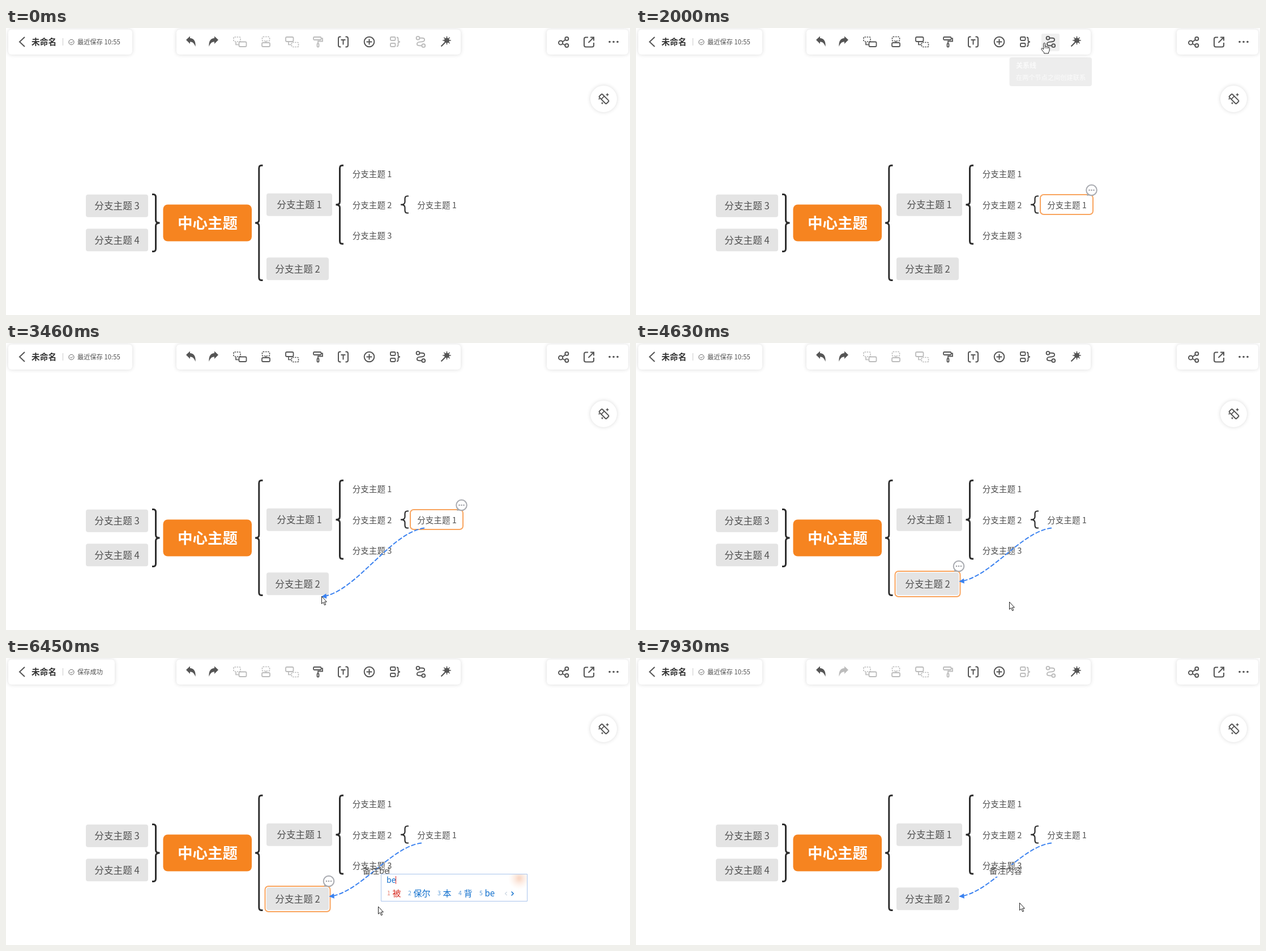
Recreate the animation shown at these times as an HTML page with a canvas. Size 1102x508 px, loop 8 s.

```html
<!DOCTYPE html>
<html lang="zh-CN">
<head>
<meta charset="utf-8">
<title>思维导图</title>
<style>
html, body { margin: 0; width: 100%; height: 100%; overflow: hidden; background: #fff; }
canvas { display: block; width: 1102px; height: 508px; }
</style>
</head>
<body>
<canvas id="stage" width="1102" height="508"></canvas>
<script>
const c = document.getElementById('stage').getContext('2d');
const LOOP = 8000;
const FAMILY = '"Noto Sans CJK SC", "Noto Sans CJK", sans-serif';
const DARK = '#555', FADED = '#bcbcbc', INK = '#333', SOFT = '#505050';
const BLUE = '#3b82f0', ORANGE = '#f68420';

// ---------- helpers ----------
function font(size, weight = 350) { c.font = `${weight} ${size}px ${FAMILY}`; }

function text(str, x, cy, size, color = INK, weight = 350, align = 'left') {
  font(size, weight);
  c.fillStyle = color;
  c.textAlign = align;
  c.fillText(str, x, cy + size * 0.38);
}

function measure(str, size, weight = 350) {
  font(size, weight);
  return c.measureText(str).width;
}

function stroke(path, color = DARK, width = 2, dash = []) {
  c.strokeStyle = color;
  c.lineWidth = width;
  c.setLineDash(dash);
  c.stroke(new Path2D(path));
  c.setLineDash([]);
}

function fill(path, color = DARK) {
  c.fillStyle = color;
  c.fill(new Path2D(path));
}

function box(x, y, w, h, r, color) {
  c.beginPath();
  c.roundRect(x, y, w, h, r);
  c.fillStyle = color;
  c.fill();
}

function frame(x, y, w, h, r, color, width = 2, dash = []) {
  c.beginPath();
  c.roundRect(x, y, w, h, r);
  c.strokeStyle = color;
  c.lineWidth = width;
  c.setLineDash(dash);
  c.stroke();
  c.setLineDash([]);
}

function dot(x, y, r, color) {
  c.beginPath();
  c.arc(x, y, r, 0, 7);
  c.fillStyle = color;
  c.fill();
}

function ring(x, y, r, color = DARK, width = 2) {
  c.beginPath();
  c.arc(x, y, r, 0, 7);
  c.strokeStyle = color;
  c.lineWidth = width;
  c.stroke();
}

function panel(x, y, w, h, r) {
  c.save();
  c.shadowColor = 'rgba(0,0,0,.15)';
  c.shadowBlur = 7;
  box(x, y, w, h, r, '#fff');
  c.restore();
}

function lastKey(keys, t) {
  let found = null;
  for (const k of keys) if (t >= k[0]) found = k;
  return found;
}

// ---------- timing ----------
const PATH = [
  [130, 1084, 494], [300, 990, 468], [480, 840, 430], [620, 740, 395], [760, 757, 357],
  [900, 748, 311], [1440, 748, 311], [1580, 738, 220], [1720, 725, 110], [1860, 720, 42],
  [2000, 721, 26], [2210, 724, 25], [2280, 726, 24], [2750, 726, 24], [2890, 722, 70],
  [3030, 706, 210], [3180, 682, 360], [3250, 664, 410], [3320, 632, 450], [3390, 592, 472],
  [3460, 557, 448], [3530, 556, 444], [4220, 556, 444], [4360, 600, 464], [4500, 650, 472],
  [4630, 659, 458], [4770, 657, 439.5], [7120, 657, 439.5], [7320, 657, 438], [7790, 657, 438],
  [7860, 667, 436], [7930, 677, 433], [8000, 677, 433]
];

function cursorAt(t) {
  if (t < PATH[0][0]) return null;
  const i = PATH.findIndex(k => k[0] > t);
  const [t0, x0, y0] = PATH[i - 1], [t1, x1, y1] = PATH[i];
  const p = (t - t0) / (t1 - t0);
  return { x: x0 + (x1 - x0) * p, y: y0 + (y1 - y0) * p };
}

const CLICKS = [[900, 1040], [2750, 2890], [3530, 3670], [7520, 7590]];

// time, committed text, pending letters, candidates
const FIRST = '不 吧 把 被 版本', SECOND = '被 保尔 本 背 be', LONG = '内人 内容物 内热 内容简介 内绕';
const TYPING = [
  [5970, '', 'b', FIRST], [6110, '', 'bz', '备注 不在 本 把 吧'], [6310, '备注', ''],
  [6380, '备注', 'b', FIRST], [6450, '备注', 'be', SECOND], [6540, '备注', 'b', FIRST],
  [6620, '备注', ''], [6690, '备注', 'n', '你 那 呢 年 能'], [6760, '备注', 'ne', '呢 哪 讷 那 ne'],
  [6830, '备注', 'nei', '内 那 内部 馁 哪'], [6900, '备注', 'neir', LONG], [6980, '备注', 'neiro', LONG],
  [7050, '备注', 'neirong', '内容 内 哪 呢 那'], [7190, '备注内容', '']
];

// ---------- toolbar ----------
const UNDO = 'M318 21L325 14.5V18C331 18 335.5 23 334.5 33C332.5 27 329.5 24.5 325 24.5V28Z';

function toolbar(state, hover) {
  panel(301, 2.5, 502, 44.5, 6);
  if (hover) box(716, 10, 32, 31, 3, '#f0f0f0');
  const node = state.node ? DARK : FADED;
  const insert = state.insert ? DARK : FADED;
  const dash = [2.5, 1.6];

  fill(UNDO);
  c.save();
  c.translate(693, 0);
  c.scale(-1, 1);
  fill(UNDO, state.redo ? DARK : FADED);
  c.restore();

  frame(402, 16, 12, 8, 1.5, insert, 1.7, dash);
  stroke('M406 25V29.5H411', insert, 1.7);
  frame(411.5, 24.5, 13, 8.5, 2, insert, 1.8);

  frame(452.5, 15.5, 13, 7.5, 1.5, insert, 1.7, dash);
  stroke('M459 23V26', insert, 1.7);
  frame(452, 26, 14, 7, 2, insert, 1.8);

  frame(494, 16, 13.5, 8, 2, insert, 1.8);
  stroke('M499 24V29.5H504', insert, 1.7);
  frame(504.5, 25.5, 12, 8, 1.5, insert, 1.7, dash);

  frame(543, 16, 13.5, 5, 1.5, node, 1.8);
  stroke('M557 18.5H559V23.5H551V27', node, 1.8);
  frame(549.5, 27.5, 3, 6, 1, node, 1.8);

  stroke('M591.5 15.5H590Q587 15.5 587 18.5V30.5Q587 33.5 590 33.5H591.5M599.5 15.5H601Q604 15.5 604 18.5V30.5Q604 33.5 601 33.5H599.5');
  stroke('M591.5 21H599.5M595.5 21V29.5');

  ring(641.5, 24.5, 8.8);
  stroke('M636.5 24.5H646.5M641.5 19.5V29.5');

  frame(679, 16, 8.5, 6, 1.5, node, 1.9);
  frame(679, 27, 8.5, 6, 1.5, node, 1.9);
  stroke('M690 16.5Q692.5 16.5 692.5 19V22Q692.5 24.5 696 24.5Q692.5 24.5 692.5 27V30Q692.5 32.5 690 32.5', node, 1.9);

  ring(727.5, 17.8, 2.9, node, 1.9);
  ring(737.3, 31.2, 2.9, node, 1.9);
  stroke('M731 17.8H735C740.5 17.8 740.5 23.5 735 24.2L730 24.9C724.5 25.6 724.5 31.2 730 31.2H734', node, 1.9);

  stroke('M775 26L768.5 32.5', DARK, 2.2);
  dot(778.5, 22, 4.6, DARK);
  for (let i = 0; i < 8; i++) {
    const a = i * Math.PI / 4;
    const x = Math.cos(a), y = Math.sin(a);
    stroke(`M${778.5 + 4 * x} ${22 + 4 * y}L${778.5 + 7.3 * x} ${22 + 7.3 * y}`, DARK, 1.5);
  }
}

function header(saved) {
  panel(4, 2.5, saved ? 188 : 219, 44.5, 6);
  stroke('M33 16L24 24.5L33 33');
  text('未命名', 45, 24.5, 14.8, INK, 700);
  stroke('M100.5 18V31', '#ccc', 1);
  ring(115.5, 25, 4.6, '#666', 1);
  stroke('M113.3 25L115.1 26.8L118 23.6', '#666', 1);
  text(saved ? '保存成功' : '最近保存 10:55', 126, 24.8, 11.25, SOFT, 400);
}

function sideTools() {
  panel(955, 2.5, 144, 44.5, 6);
  stroke('M983 24.5L987.5 21M983 28L987.5 30.5');
  ring(979.6, 26, 3.6);
  ring(990.3, 19, 3);
  ring(990.3, 31, 3);
  stroke('M1028 16.5H1024Q1021 16.5 1021 19.5V30.5Q1021 33.5 1024 33.5H1035Q1038 33.5 1038 30.5V26M1028.5 26L1037.5 17M1032 16.5H1038V22.5');
  for (const x of [1066, 1073, 1080]) dot(x, 24.5, 1.8, DARK);

  panel(1032, 102, 47, 47, 23.5);
  c.save();
  c.translate(1056, 125.5);
  c.rotate(Math.PI / 4);
  frame(-9, -3.8, 18, 7.6, 1.5, DARK, 1.9);
  stroke('M-3 -3.8V3.8', DARK, 1.7);
  c.restore();
  for (const [x, y, r] of [[1062, 118, 3.2], [1053, 133, 2.4], [1047.5, 125.5, 1.8]]) {
    const q = r * 0.3;
    fill(`M${x} ${y - r}l${q} ${r - q}l${r - q} ${q}l${q - r} ${q}l${-q} ${r - q}l${-q} ${q - r}l${q - r} ${-q}l${r - q} ${-q}Z`);
  }
}

// ---------- mind map ----------
function brace(end, spine, tip, top, bottom, mid, width) {
  const d = Math.sign(end - spine), e = spine + d * 4;
  stroke(`M${end} ${top}H${e}Q${spine} ${top} ${spine} ${top + 5}V${mid - 5}Q${spine} ${mid} ${tip} ${mid}` +
    `Q${spine} ${mid} ${spine} ${mid + 5}V${bottom - 5}Q${spine} ${bottom} ${e} ${bottom}H${end}`, '#2e2e2e', width);
}

function node(label, x, y, w) {
  box(x, y, w, 40, 4, '#e4e4e4');
  text(label, x + w / 2, y + 20, 16.6, SOFT, 350, 'center');
}

function leaf(label, x, y) { text(label, x, y, 14.6, SOFT, 350, 'center'); }

function mindMap() {
  node('分支主题 3', 141, 294.7, 110);
  node('分支主题 4', 141, 355.3, 110);
  node('分支主题 1', 460, 292.7, 116);
  node('分支主题 2', 460, 406.3, 110);
  box(277.5, 312.5, 156.5, 65, 8, ORANGE);
  text('中心主题', 356, 345, 26.5, '#fff', 700, 'center');
  brace(258, 264.5, 271.5, 294.5, 395.5, 345, 3);
  brace(453.5, 446.8, 440, 243.2, 446.5, 345, 3);
  brace(596, 589.5, 582.5, 243.2, 382, 312.7, 3);
  brace(711, 704.5, 697, 297.5, 327.5, 312.7, 2.2);
  leaf('分支主题 1', 646.5, 258);
  leaf('分支主题 2', 646.5, 313);
  leaf('分支主题 3', 646.5, 367.5);
  leaf('分支主题 1', 761, 313);
}

function bubble(x, y) {
  fill(`M${x - 8} ${y + 4}L${x - 8} ${y + 10}L${x - 1} ${y + 9}Z`, '#aaa');
  dot(x, y, 9.3, '#fff');
  ring(x, y, 9.3, '#a8aab0', 2);
  for (const d of [-4, 0, 4]) dot(x + d, y, 1.3, '#a0a2a8');
}

function selection(x, y, w, h, bx, by, solid) {
  c.globalAlpha = solid ? 1 : 0.5;
  frame(x, y, w, h, 6, '#f9a45e', solid ? 2 : 1.5);
  c.globalAlpha = 1;
  bubble(bx, by);
}

// ---------- relation line ----------
function relation(x0, y0, x1, y1) {
  const dx = x1 - x0, dy = y1 - y0;
  const qx = x0 + dx * 0.67, qy = y0 + dy * 0.94;
  stroke(`M${x0} ${y0}C${x0 + dx * 0.33} ${y0 + dy * 0.06} ${qx} ${qy} ${x1} ${y1}`, BLUE, 2, [8, 3]);
  c.save();
  c.translate(x1, y1);
  c.rotate(Math.atan2(y1 - qy, x1 - qx));
  fill('M1 0L-8 -4.5V4.5Z', BLUE);
  c.restore();
}

function dragLine(p) {
  const dx = p.x - 761, dy = p.y - 313;
  const k = Math.min(47 / Math.abs(dx), 14.5 / Math.abs(dy), 1);
  relation(761 + dx * k, 313 + dy * k, p.x + 1, p.y + 1);
}

function fixedLine(gap) {
  c.save();
  if (gap) {
    const hole = new Path2D('M0 0H1102V508H0Z');
    hole.rect(622, 366, 61, 21);
    c.clip(hole, 'evenodd');
  }
  relation(734, 327.5, 571.5, 422);
  c.restore();
}

// ---------- label editing ----------
function candidates(left, pending, words) {
  const list = words.split(' ');
  const widths = list.map(w => measure(w, 15, 400));
  const w = Math.round(55 + widths.reduce((sum, n) => sum + n + 22, 0));
  left = Math.floor(left) + 0.5;
  c.save();
  c.beginPath();
  c.rect(left, 382.5, w, 48);
  c.fillStyle = '#fff';
  c.fill();
  c.clip();
  const glow = c.createRadialGradient(left + w - 14, 390, 2, left + w - 14, 390, 20);
  glow.addColorStop(0, '#f9d9c8');
  glow.addColorStop(1, 'rgba(255,240,232,0)');
  c.fillStyle = glow;
  c.fillRect(left + w - 36, 382, 36, 30);
  c.restore();
  frame(left, 382.5, w, 48, 0, '#a9c4ec', 1);

  text(pending, left + 9.5, 393, 14, '#0a6ccc', 400);
  const caret = Math.round(left + 9.5 + measure(pending, 14, 400)) + 0.5;
  stroke(`M${caret} 386V400`, '#e03030', 1);
  let x = left + 10.5;
  list.forEach((word, i) => {
    text(String(i + 1), x, 416, 10.5, i ? '#5c9bd8' : '#e88070', 400);
    text(word, x + 9.5, 416, 15, i ? '#0a6ccc' : '#d93025', 400);
    x += widths[i] + 22;
  });
  stroke(`M${x + 9} 414L${x + 6} 417L${x + 9} 420`, '#ccd6e2', 1.2);
  stroke(`M${x + 17} 413.5L${x + 20.5} 417L${x + 17} 420.5`, '#0a6ccc', 1.4);
}

function label(t) {
  const typed = lastKey(TYPING, t);
  if (!typed) {
    const on = t >= 3910 && Math.floor((t - 3910) / 530) % 2 === 0;
    if (on) stroke('M653.5 375V390', INK, 1);
    return;
  }
  const [, done, pending, words] = typed;
  const full = done + pending;
  leaf(full, 653, 376.3);
  const w = measure(full, 14.6);
  if (t < 7520) stroke(`M${653 + w / 2} 369V383`, INK, 1);
  if (pending) candidates(656 - w / 2 + measure(done, 14.6), pending, words);
}

// ---------- pointer and tooltip ----------
function tooltip(t) {
  if (t < 1970 || t >= 2750) return;
  const p = Math.min(1, (t - 1970) / 320);
  c.globalAlpha = p;
  box(659.5, 52, 145.5, 51, 4, 'rgba(0,0,0,.72)');
  c.globalAlpha = Math.min(1, 0.6 + p);
  text('关系线', 671, 66.5, 12, '#fff', 700);
  text('在两个节点之间创建联系', 671, 88, 11.2, '#fff', 400);
  c.globalAlpha = 1;
}

const ARROW = 'M.5 .5V13.6L3.5 10.9L5.6 16L7.7 15.1L5.6 10.2H9.4Z';
const HAND = 'M-1.3 1.4Q0 -.6 1.5 1.4V6.6Q3 5.4 4.2 7Q5.8 6.2 6.8 7.8Q8.8 7.2 9.2 9.4V13Q9 15.6 7.6 17V19H-.4V17.4' +
  'Q-2.6 15.4 -5 11.6Q-5.4 9.6 -3.4 9.8L-1.3 12Z';

function pointer(p, hand) {
  c.save();
  c.translate(p.x, p.y);
  c.lineJoin = 'round';
  fill(hand ? HAND : ARROW, '#fff');
  stroke(hand ? HAND : ARROW, '#222', 1);
  if (hand) stroke('M1.5 6.6V10M4.2 7.4V10.4M6.8 8V10.6', '#222', 0.9);
  c.restore();
}

// ---------- scene ----------
function draw(t) {
  c.clearRect(0, 0, 1102, 508);
  const p = cursorAt(t);
  const hand = p && p.y < 42 && p.x > 716 && p.x < 748;
  const picked = t >= 970 && t < 7520;

  mindMap();
  if (t >= 830 && t < 3600) selection(714, 295, 93, 35, 804.5, 287, picked);
  if (t >= 3530 && t < 7520) selection(457.5, 404, 115, 45, 570, 395, t >= 3600);
  if (t >= 2820 && t < 3600) dragLine(p);
  if (t >= 3600) fixedLine(t >= 7520);
  label(t);

  header(t >= 6040 && t < 7000);
  toolbar({ node: picked, insert: picked && t < 3600, redo: t < 7520 }, hand);
  sideTools();
  tooltip(t);

  if (!p) return;
  if (CLICKS.some(([a, b]) => t >= a && t < b)) dot(p.x, p.y, 10.3, 'rgba(244,240,30,.75)');
  pointer(p, hand);
}

function tick() {
  draw(performance.now() % LOOP);
  requestAnimationFrame(tick);
}
tick();
</script>
</body>
</html>
```
